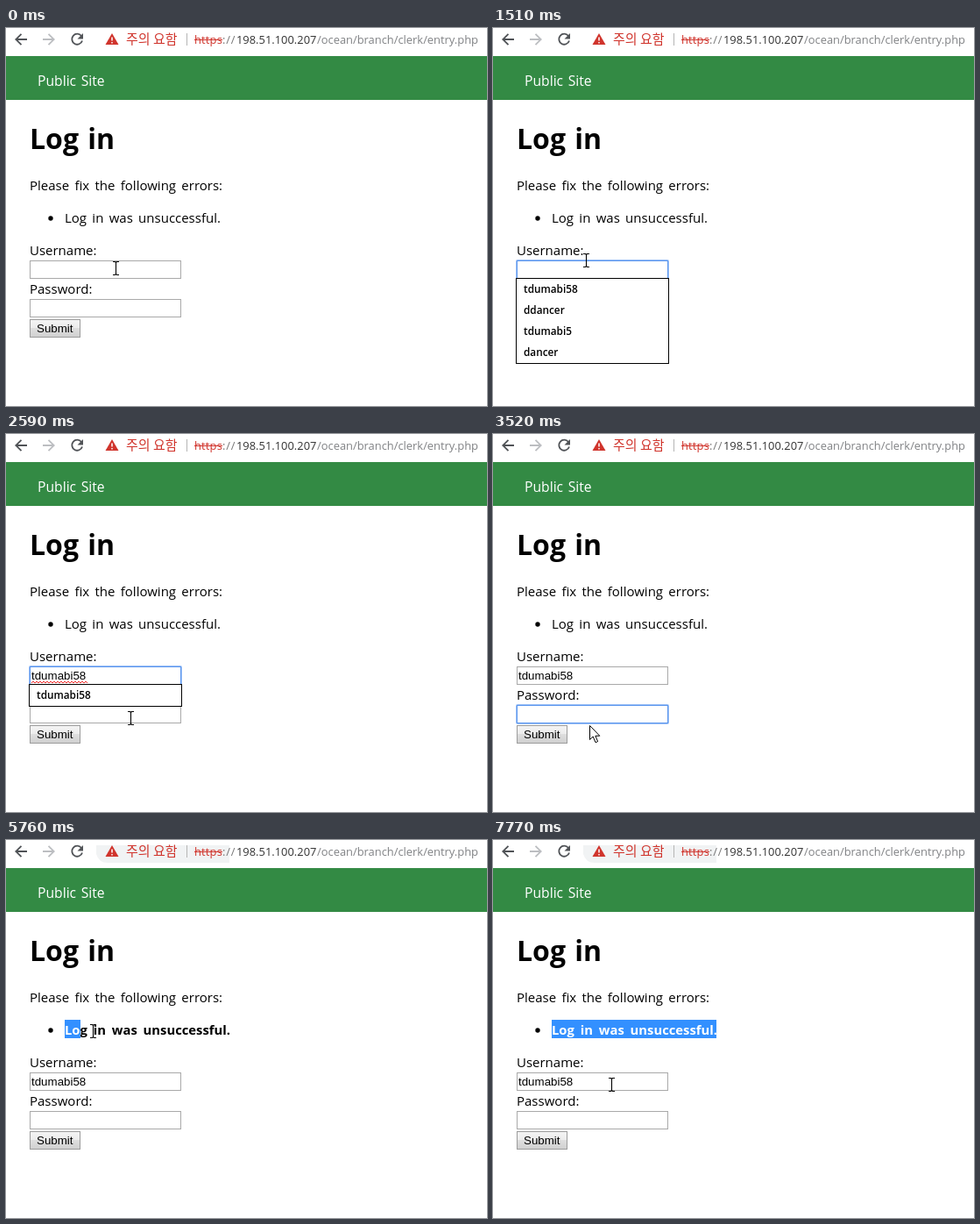
An HTML page that plays this animation: 549x431 px, repeating every 8 s.

```html
<!DOCTYPE html>
<html lang="en">
<head>
<meta charset="utf-8">
<title>Log in</title>
<style>
  html, body { margin: 0; width: 100%; height: 100%; overflow: hidden; background: #fff; }
  svg { display: block; width: 549px; height: 431px; }
  text { font-family: "Open Sans", "Noto Sans", sans-serif; white-space: pre; }
  .body { font-size: 15px; word-spacing: 2.4px; }
  .nav { font-size: 15.7px; word-spacing: 1.5px; }
  .title { font-size: 32px; font-weight: 700; word-spacing: 2px; }
  .strong { font-size: 14.8px; font-weight: 700; word-spacing: 3px; }
  .url { font-size: 12.9px; }
  .form { font: 13.33px "Liberation Sans", Arial, sans-serif; }
  .item { font-size: 11.8px; font-weight: 600; }
  .field { fill: #fff; stroke: #a9a9a9; }
  .field.focus { stroke: #5b96ee; }
</style>
</head>
<body>
<svg viewBox="0 0 549 431">
  <defs>
    <linearGradient id="face" x2="0" y2="1">
      <stop stop-color="#f4f4f4"/>
      <stop offset=".5" stop-color="#ececec"/>
      <stop offset=".5" stop-color="#dedede"/>
      <stop offset="1" stop-color="#d0d0d0"/>
    </linearGradient>
    <clipPath id="selClip"><rect id="selBox" x="67" y="205" width="0" height="21"/></clipPath>
  </defs>
  <rect width="549" height="431" fill="#fff"/>

  <!-- browser bar -->
  <path id="pill" d="M103 6H255V26H116Q106 26 103 16Z" fill="#f1f3f4"/>
  <g fill="none" stroke-width="1.8">
    <path d="M24 13H11.5M17.5 6.8L11.3 13L17.5 19.2" stroke="#505357"/>
    <path d="M42 13H54.5M48.5 6.8L54.7 13L48.5 19.2" stroke="#bcbec1"/>
    <path d="M86 9A6 6 0 1 0 87 14.5" stroke="#505357"/>
  </g>
  <path d="M88 6V12.5H81.5Z" fill="#505357"/>
  <path d="M121 6L128.5 19H113.5Z" fill="#d0342c"/>
  <path d="M121 10.5V14.5M121 16V17.5" stroke="#fff" stroke-width="1.5"/>
  <text x="137" y="18" fill="#d0342c" style="font:15px 'Noto Sans CJK KR','Noto Sans CJK',sans-serif">주의 요함</text>
  <path d="M206.5 6V20" stroke="#b5b5b5"/>
  <g class="url">
    <text x="215" y="18" fill="#d0342c" letter-spacing=".2">https</text>
    <path d="M215 13.5H247" stroke="#d0342c"/>
    <text x="247" y="18" fill="#777" letter-spacing=".8">://</text>
    <text x="263" y="18" fill="#333">198.51.100.207</text>
    <text x="355" y="18" fill="#808285">/ocean/branch/clerk/entry.php</text>
  </g>

  <!-- page -->
  <rect y="32" width="549" height="50" fill="#338a44"/>
  <text class="nav" x="36" y="66" fill="#fff">Public Site</text>
  <text class="title" x="27" y="138">Log in</text>
  <text class="body" x="27" y="185">Please fix the following errors:</text>
  <circle cx="51" cy="217" r="2.7"/>
  <text id="error" x="67" y="222">Log in was unsuccessful.</text>
  <g clip-path="url(#selClip)">
    <rect x="67" y="205" width="188" height="21" fill="#3390ff"/>
    <text class="strong" x="67" y="222" fill="#fff">Log in was unsuccessful.</text>
  </g>
  <text class="body" x="27" y="259">Username:</text>
  <rect id="user" class="field" x="27.5" y="265.5" width="172" height="20"/>
  <text id="typed" class="form" x="29" y="280"></text>
  <path id="wave" fill="none" stroke="#f03030"/>
  <text class="body" x="27" y="303">Password:</text>
  <rect id="pass" class="field" x="27.5" y="309.5" width="172" height="20"/>
  <rect id="ring" x="26.5" width="174" height="22" rx="1" fill="none" stroke="#9cc0f6"/>
  <rect x="27.5" y="332.5" width="57" height="20" fill="url(#face)" stroke="#9c9c9c"/>
  <text class="form" x="35" y="347">Submit</text>

  <g id="menu">
    <rect id="menuBox" x="26.5" y="285.5" width="174" height="97" fill="#fff" stroke="#000"/>
    <rect id="hover" x="27" y="286" width="173" height="24" fill="#e6e6e6"/>
    <text class="item" x="35" y="302"></text>
    <text class="item" x="35" y="326"></text>
    <text class="item" x="35" y="350"></text>
    <text class="item" x="35" y="374"></text>
  </g>

  <path id="beam" d="M-3.5 -7.5H-1L0 -6.5L1 -7.5H3.5M0 -7V7M-3.5 7.5H-1L0 6.5L1 7.5H3.5" fill="none" stroke="#000" stroke-width="1.1"/>
  <path id="arrow" d="M.5 .5V16.5L4.2 13L7 19.7L9.6 18.6L6.9 12.2H11.8Z" fill="#fff" stroke="#000"/>
</svg>
<script>
const LOOP = 8000;
const $ = id => document.getElementById(id);
const names = ["tdumabi58", "ddancer", "tdumabi5", "dancer"];
const items = document.querySelectorAll(".item");

// first step, last step, step count, end x, end y, pointer
const moves = [
  [0, 0, 1, 125, 274, "beam"],
  [690, 810, 2, 113, 281, "beam"],
  [960, 960, 1, 106, 294, "arrow"],
  [1240, 1510, 3, 106, 265, "beam"],
  [2070, 2590, 5, 142, 324, "beam"],
  [2890, 3280, 4, 120, 327, "beam"],
  [3410, 3800, 4, 80, 345, "arrow"],
  [3950, 4340, 3, 85, 347, "arrow"],
  [4770, 5200, 4, 63, 214, "arrow"],
  [5480, 5480, 1, 70, 223, "beam"],
  [5760, 5760, 1, 99, 218, "beam"],
  [5900, 6040, 2, 235, 219, "beam"],
  [6180, 6180, 1, 266, 224, "arrow"],
  [6320, 6600, 3, 207, 296, "arrow"],
  [6740, 6740, 1, 191, 311, "beam"],
  [6890, 6890, 1, 190, 311, "beam"],
  [7470, 7770, 3, 135, 279, "beam"]
];

const show = (id, on) => $(id).setAttribute("visibility", on ? "visible" : "hidden");
const within = (t, from, to) => t >= from && t < to;

// share of a stepped move done at time t
function stepped(t, from, to, n) {
  if (t < from) return 0;
  const k = n > 1 ? Math.floor((t - from) / (to - from) * (n - 1) + 1e-6) : 0;
  return Math.min(1, (k + 1) / n);
}

function pointer(t) {
  let x = 125, y = 274, kind = "beam";
  for (const [from, to, n, ex, ey, k] of moves) {
    if (t < from) break;
    const p = stepped(t, from, to, n);
    x += (ex - x) * p;
    y += (ey - y) * p;
    kind = k;
  }
  for (const id of ["beam", "arrow"]) show(id, id === kind);
  const offset = kind === "beam" ? 0.5 : 0;
  $(kind).setAttribute("transform", `translate(${Math.round(x) + offset} ${Math.round(y)})`);
}

function fields(t) {
  const userFocus = within(t, 150, 2890), passFocus = within(t, 2890, 3950);
  const word = names[0].slice(0, Math.round(9 * stepped(t, 2070, 2590, 5)));
  $("user").classList.toggle("focus", userFocus);
  $("pass").classList.toggle("focus", passFocus);
  show("ring", userFocus || passFocus);
  $("ring").setAttribute("y", passFocus ? 308.5 : 264.5);
  $("typed").textContent = word;
  const waves = userFocus && word ? Math.round($("typed").getComputedTextLength() / 4) : 0;
  $("wave").setAttribute("d", "M29 284" + "l2 -2l2 2".repeat(waves));

  const rows = names.filter(n => n.startsWith(word));
  show("menu", userFocus);
  show("hover", within(t, 960, 1240));
  $("menuBox").setAttribute("height", rows.length * 24 + 1);
  items.forEach((el, i) => el.textContent = rows[i] || "");
}

function selectionWidth(t) {
  if (t < 5760) return 0;
  if (t < 5900) return 18;
  if (t < 6040) return 93;
  return t < 6180 ? 165 : 188;
}

function draw(now) {
  const t = now % LOOP;
  const reloaded = t >= 3950;
  show("pill", reloaded);
  $("error").setAttribute("class", reloaded ? "strong" : "body");
  $("selBox").setAttribute("width", selectionWidth(t));
  fields(t);
  pointer(t);
}

const start = performance.now();
function tick() {
  draw(performance.now() - start);
  requestAnimationFrame(tick);
}
tick();
</script>
</body>
</html>
```
